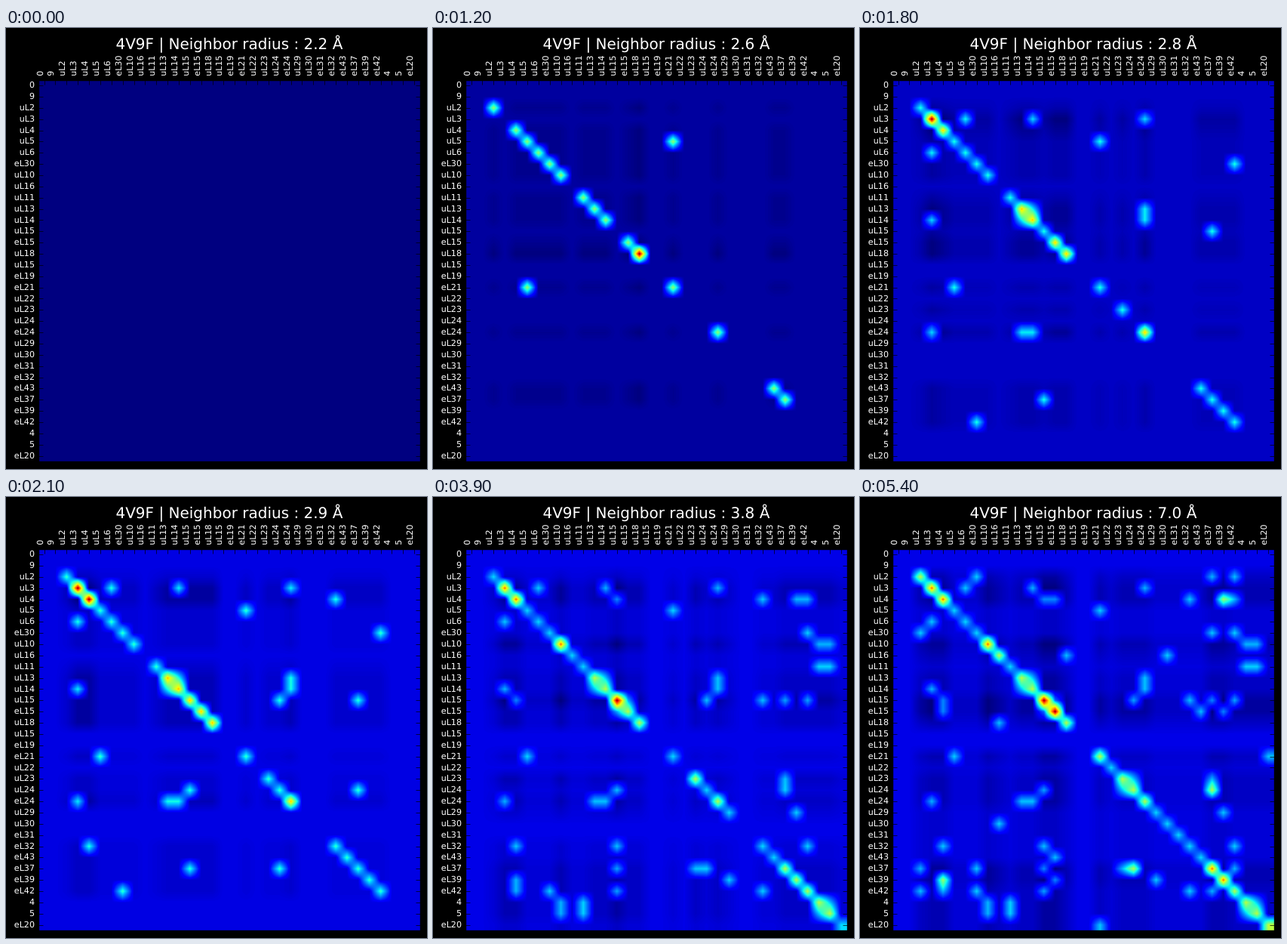
These frames come from a looping animation (558 px wide and 584 px high, 5700 ms). An HTML page with a canvas:

```html
<!DOCTYPE html>
<html lang="en">
<head>
<meta charset="utf-8">
<title>Neighbor radius</title>
<style>
html, body { margin: 0; width: 100%; height: 100%; overflow: hidden; background: #000; }
canvas, svg { position: absolute; left: 0; top: 0; display: block; }
text {
  font-family: "DejaVu Sans", sans-serif; font-size: 11.11px; fill: #fff;
  font-kerning: none; text-rendering: geometricPrecision;
}
#title { font-size: 20px; text-anchor: middle; }
</style>
</head>
<body>
<canvas id="map" width="558" height="584"></canvas>
<svg id="axes" width="558" height="584" viewBox="0 0 558 584">
  <text id="title" x="295.9" y="28"></text>
</svg>
<script>
const STEP = 300;
const LABELS = ('0 9 uL2 uL3 uL4 uL5 uL6 eL30 uL10 uL16 uL11 uL13 uL14 uL15 eL15 uL18 uL15 ' +
  'eL19 eL21 uL22 uL23 uL24 eL24 uL29 uL30 eL31 eL32 eL43 eL37 eL39 eL42 4 5 eL20').split(' ');
const N = LABELS.length;

// One entry per step: radius, then the contacts that appear at it
const STEPS = `2.2
2.3 7-14 8-10
2.4 2-27 5-15
2.5 12-22 6-11
2.6 4-28 15-18
2.7 3-11 3-12 3-22
2.8 14-30 20-29 4-13
2.9 4-21 13-26
3.0 28-29 13-13
3.1
3.2 31-32
3.4 8-31 8-32 20-23
3.6
3.8 13-30 9-33
4.0 2-14
4.5 24-33
5.0 9-18 19-25
6.0 14-28
7.0 21-29`.split('\n').map(line => {
  const [radius, ...pairs] = line.split(' ');
  return { radius, pairs: pairs.map(p => p.split('-').map(Number)) };
});

// Plot area
const X0 = 43.17, Y0 = 68.62, CELL = 505.4 / N;
const LEFT = 44, TOP = 70, W = 505, H = 504;
const center = (start, i) => start + (i + 0.5) * CELL;

// Jet colour map with 256 levels
function ramp(stops, x) {
  for (let i = 1; i < stops.length; i++) {
    const [xa, ya] = stops[i - 1], [xb, yb] = stops[i];
    if (x <= xb) return ya + (yb - ya) * (x - xa) / (xb - xa);
  }
  return stops[stops.length - 1][1];
}
const RED = [[0, 0], [.35, 0], [.66, 1], [.89, 1], [1, .5]];
const GREEN = [[0, 0], [.125, 0], [.375, 1], [.64, 1], [.91, 0], [1, 0]];
const BLUE = [[0, .5], [.11, 1], [.34, 1], [.65, 0], [1, 0]];
const JET = Array.from({ length: 256 }, (_, i) =>
  [RED, GREEN, BLUE].map(c => Math.round(255 * ramp(c, i / 255))));

// Covariance of the contact rows, scaled to 0..1
function covariance(step) {
  const A = Array.from({ length: N }, () => new Array(N).fill(0));
  for (const { pairs } of STEPS.slice(0, step + 1))
    for (const [a, b] of pairs) A[a][b] = A[b][a] = 1;
  const deg = A.map(row => row.reduce((s, v) => s + v, 0));
  const C = A.map((r, i) => A.map((q, j) =>
    r.reduce((s, v, k) => s + v * q[k], 0) - deg[i] * deg[j] / N));
  const all = C.flat(), min = Math.min(...all), span = Math.max(...all) - min;
  return C.map(row => row.map(v => span ? (v - min) / span : 0));
}

// Neighbouring cells and blend weight for each pixel along one axis
function samples(count, first, start) {
  return Array.from({ length: count }, (_, p) => {
    const u = Math.min(N - 1, Math.max(0, (first + p + 0.5 - start) / CELL - 0.5));
    const i = Math.min(N - 2, Math.floor(u));
    return [i, u - i];
  });
}
const COLS = samples(W, LEFT, X0), ROWS = samples(H, TOP, Y0);

const ctx = document.getElementById('map').getContext('2d');
const img = ctx.createImageData(W, H);

function drawMap(step) {
  const C = covariance(step), d = img.data;
  let o = 0;
  for (const [r, fy] of ROWS) {
    const a = C[r], b = C[r + 1];
    for (const [c, fx] of COLS) {
      const top = a[c] + (a[c + 1] - a[c]) * fx;
      const low = b[c] + (b[c + 1] - b[c]) * fx;
      const v = top + (low - top) * fy;
      const rgb = JET[Math.min(255, Math.floor(v * 256))];
      d[o++] = rgb[0];
      d[o++] = rgb[1];
      d[o++] = rgb[2];
      d[o++] = 255;
    }
  }
  ctx.putImageData(img, LEFT, TOP);
}

const svg = document.getElementById('axes');
function add(tag, attrs, text = '') {
  const el = document.createElementNS('http://www.w3.org/2000/svg', tag);
  for (const k in attrs) el.setAttribute(k, attrs[k]);
  el.textContent = text;
  svg.appendChild(el);
}

function drawAxes() {
  let ticks = '';
  LABELS.forEach((name, i) => {
    const x = center(X0, i), y = center(Y0, i);
    const tx = Math.round(x) + 0.5, ty = Math.round(y) + 0.5;
    ticks += `M${tx} 69.5v6M43.5 ${ty}h6M549.5 ${ty}h-6`;
    add('text', { x: 38, y: Math.round(y + 3.1), 'text-anchor': 'end' }, name);
    add('text', { transform: `translate(${Math.round(x - 2)} 63.7) rotate(-90)` }, name);
  });
  add('path', { d: ticks, stroke: '#000', 'stroke-width': 0.7 });
  add('rect', { x: 43.5, y: 69.5, width: 506, height: 505,
    fill: 'none', stroke: '#000', 'stroke-width': 1.39 });
}

const title = document.getElementById('title');
let shown = -1;
function render(ms) {
  const step = Math.floor(ms / STEP) % STEPS.length;
  if (step === shown) return;
  shown = step;
  title.textContent = `4V9F | Neighbor radius : ${STEPS[step].radius} Å`;
  drawMap(step);
}

drawAxes();
render(0);
const begin = performance.now();
function tick() {
  render(performance.now() - begin);
  requestAnimationFrame(tick);
}
requestAnimationFrame(tick);
</script>
</body>
</html>
```
